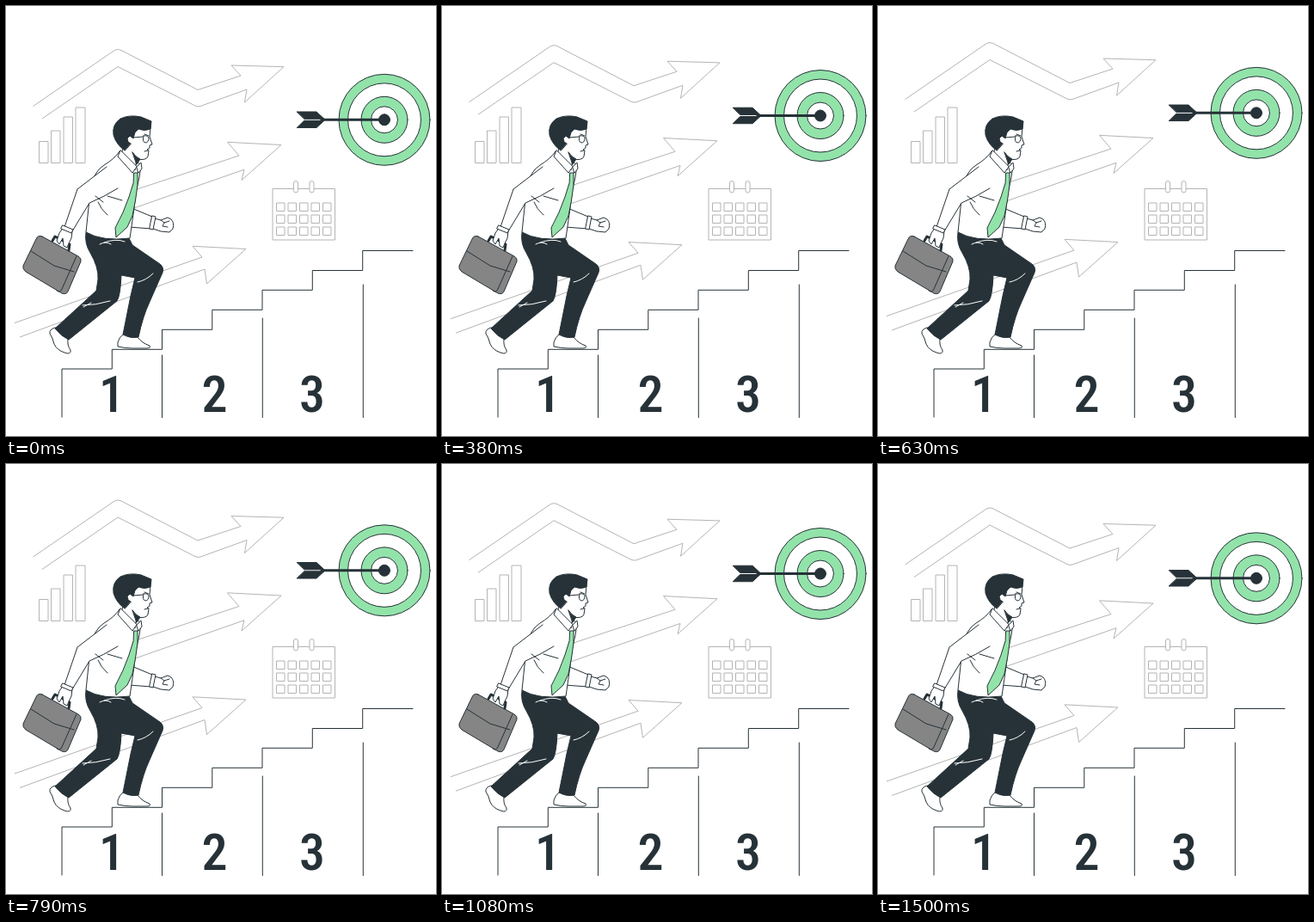
An HTML page that plays this animation: 500 px wide and 500 px high, repeating every 1.54 s.

```html
<!DOCTYPE html>
<html lang="en">
<head>
<meta charset="utf-8">
<title>Steps to the goal</title>
<style>
  html, body { margin: 0; height: 100%; overflow: hidden; background: #fff; }
  svg { display: block; width: 100vw; height: 100vh; }
  .ink { fill: none; stroke: #263238; stroke-linecap: round; stroke-linejoin: round; }
  .paper { fill: #fff; }
  .solid { fill: #263238; }
  .green { fill: #92e3a9; }
  .bag { fill: #858585; }
  .pale { fill: none; stroke: #b4b4b4; stroke-linejoin: round; }
  .crease { stroke: #fff; }
  text { font: 500 60px "Roboto Condensed", Roboto, "Open Sans", sans-serif; font-stretch: 75%; fill: #263238; text-anchor: middle; }
</style>
</head>
<body>
<svg viewBox="0 0 500 500">
  <g id="floating">
    <g class="pale">
      <path d="M31.500 116.500L124 53Q129 49 134 51.500L223 97.500 273 81 262 69 323 70.700 277.500 112 280 97 226 116.500Q223 117.500 220 116L130 70.500 42 131"/>
      <path d="M93 232.500L271 174 257.500 158.300 320 161.500 274 202.500 277 190.200 100 252"/>
      <path d="M10 368.500L228 292 217 279.300 279 282.500 233.500 323 231 306 16 385"/>
    </g>
    <g class="ink">
      <circle class="green" cx="440" cy="132.300" r="53"/>
      <circle class="paper" cx="440" cy="132.300" r="42.500"/>
      <circle class="green" cx="440" cy="132.300" r="27"/>
      <circle class="paper" cx="440" cy="132.300" r="15.500"/>
      <circle class="solid" cx="440" cy="132.300" r="6.500"/>
      <path stroke-width="3" d="M367 132.300H440"/>
      <path class="solid" d="M338.500 123H361L370 131.300H347ZM347 133.300H370L361 141.500H338.500Z"/>
    </g>
  </g>

  <g class="pale">
    <path d="M38.500 157.500h10.500v25h-10.500zM52.500 145h10.500v37.500h-10.500zM67 129h10.500v53.500h-10.500zM81 118h11v64.500h-11z"/>
    <path d="M310 212.500H382.500V272H310Z"/>
    <path id="cells"/>
    <rect class="paper" x="334.500" y="203.500" width="5" height="13.500" rx="2.500"/>
    <rect class="paper" x="353" y="203.500" width="5" height="13.500" rx="2.500"/>
  </g>

  <path class="ink" d="M65 478V422H123.300V399.300H181.500V376.300H239.800V353.300H298V330.300H356.300V307.500H414.700V284.500H473M181.500 406V478.500M298.300 363V478.500M415.300 324V478.500"/>
  <text x="123" y="472">1</text>
  <text x="242.500" y="472">2</text>
  <text x="356" y="472">3</text>

  <g class="ink">
    <!-- shoes and trousers -->
    <path class="paper" d="M57 374Q50 376 51 381 54 385 56 393 59 400 68 403 76 406 75 400 71 395 72 387Z"/>
    <path class="paper" d="M137 381Q131 386 130 391L130 396Q139 398 147 398H163Q169 398 167 395 158 392 153 385Z"/>
    <path class="solid" d="M93 263Q91 276 98 287 108 304 107 318L105 331 57 375Q64 384 73 388L129 343Q133 337 134 313L150 316 145 337 136 382Q145 387 154 385 159 361 167 344L182 310Q184 304 179 300L147 278 143 270Z"/>
    <path class="crease" d="M89 348Q104 348 121 343M90 350L99 345M153 321Q163 319 171 311M109 277Q116 273 122 277M114 275Q128 270 138 274"/>

    <!-- front arm -->
    <path class="paper" d="M146 235L170 245 169 259 143 257Z"/>
    <path class="paper" d="M173 247L180 249 188 246 192 248Q196 252 194 259L190 263 180 262 171 259Z"/>
    <path class="paper" d="M170 244L174 245 171 260 167 259Z"/>
    <path d="M180 249L184 252 190 250M184 252L182 256 188 257"/>

    <!-- shirt -->
    <path class="paper" d="M132 169Q126 178 114 185 101 193 98 215L93 263Q112 274 144 270L149 235Q150 217 155 199L157 185Z"/>
    <path class="green" d="M149 194L153 194 153 208Q151 226 147 244L141 257 128 269 127 258Q137 240 143 222L148 206Z"/>

    <!-- head -->
    <path class="paper" d="M137 163L134 172 150 191 152 178Q163 180 165 175L166 168 164 167 167 165 167 162 170 161 167 152 168 141 145 140Z"/>
    <path class="solid" d="M147 170Q151 176 156 178L152 184Z"/>
    <path class="solid" d="M138 168Q128 161 125 150 123 138 133 131 144 126 157 129L169 134 168 143Q161 146 154 143L150 147 148 154 144 151 141 154 142 158 145 160Z"/>
    <path d="M148 153L159 152M161 149L166 151M160 151Q158 158 162 159 166 159 166 153 164 150 160 151ZM161 169L165 168"/>
    <path class="paper" d="M133 168L130 175 147 194 152 187ZM152 187L157 182 158 189 154 194Z"/>

    <!-- back arm -->
    <path class="paper" stroke="none" d="M117 187L83 213 68 257 77 262 97 229 131 211Z"/>
    <path d="M117 187L83 213 68 257 77 262 97 229Q114 222 130 212M104 221L113 228M107 228Q110 236 118 243M118 221L135 226"/>

    <!-- briefcase -->
    <path class="bag" d="M42 268L84 291Q88 293 87 297L72 332Q70 336 65 334L23 309Q19 306 20 302L35 271Q37 266 42 268Z"/>
    <path d="M29 285L56 302 79 309M82 291L65 329Q63 334 59 331"/>
    <path stroke-width="3" d="M54 273L57 268 74 277 73 284"/>
    <path class="paper" d="M67 257L62 264 59 273 62 277 66 270 67 279 71 281 73 276 76 270 77 262Z"/>
    <path class="paper" d="M66 255L78 260 76 264 64 259Z"/>
  </g>
</svg>
<script>
  const LOOP = 1540, STEPS = 37, TOP = 17.5, SPEED = 0.53;
  const floating = document.getElementById("floating");

  let cells = "";
  for (let row = 0; row < 3; row++)
    for (let col = 0; col < 5; col++) cells += `M${314.5 + col * 13.5} ${229 + row * 14}h9.500v9.500h-9.500z`;
  document.getElementById("cells").setAttribute("d", cells);

  // Linear rise and fall in steps, each switching slightly early.
  function draw(now) {
    const step = Math.floor((now % LOOP) / LOOP * STEPS + 0.2);
    const y = SPEED * (Math.abs(step - TOP) - TOP);
    floating.setAttribute("transform", `translate(0 ${y})`);
    requestAnimationFrame(draw);
  }
  draw(0);
</script>
</body>
</html>
```
